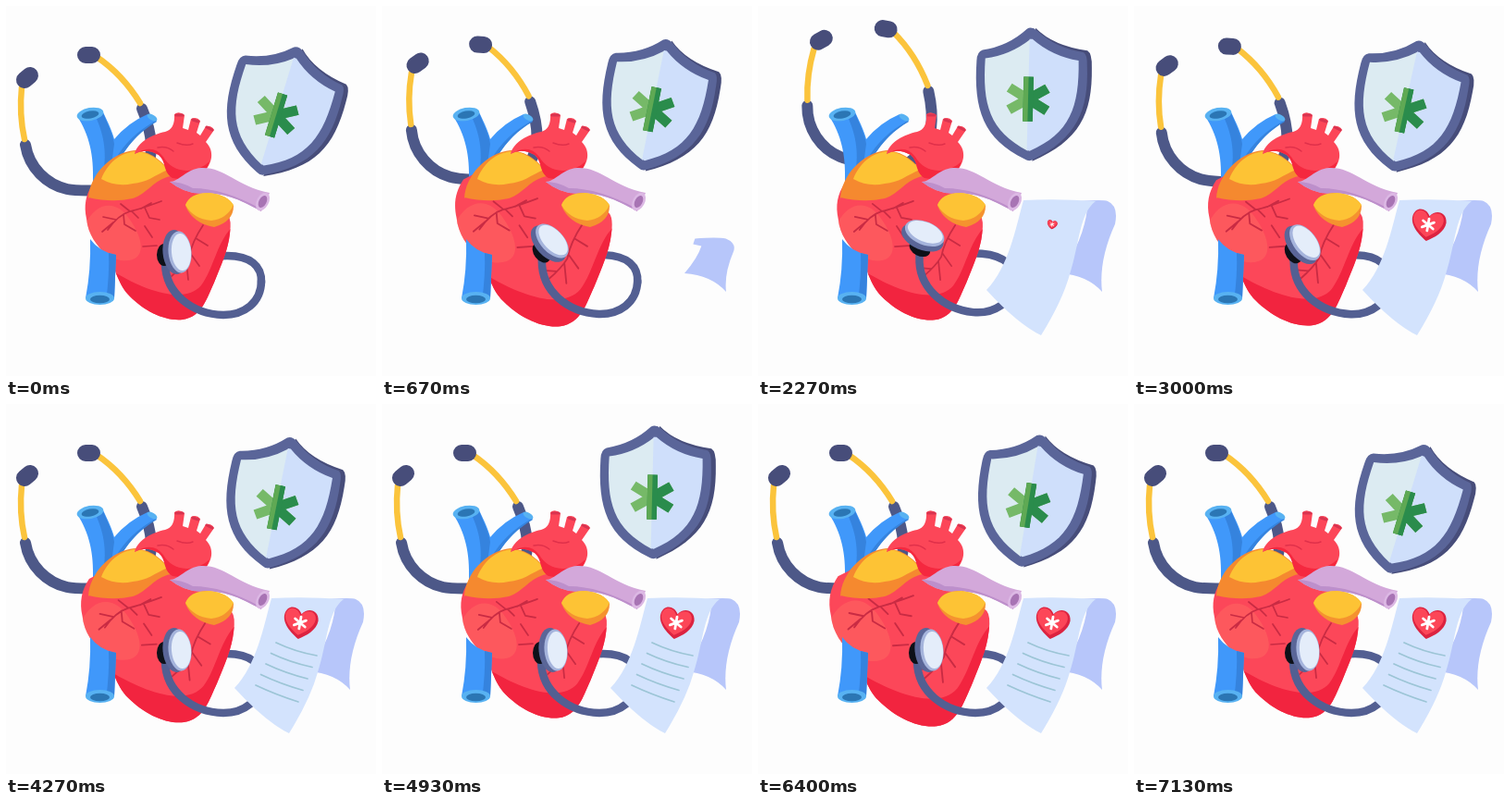
Write an HTML page that moves like this. It is 400 px wide and 400 px high and loops after 7200 ms.

```html
<!DOCTYPE html>
<html lang="en">
<head>
<meta charset="utf-8">
<title>Heart check-up</title>
<style>
html, body { margin: 0; width: 100%; height: 100%; overflow: hidden; background: #fdfdfd; }
svg { display: block; width: 100%; height: 100%; }
.line { fill: none; stroke-linecap: round; stroke-linejoin: round; }
.tube { stroke: #535f92; stroke-width: 8.5; }
.arm { stroke: #4d5888; stroke-width: 12; }
.wire { stroke: #fbc43c; stroke-width: 6.5; }
.vein { stroke: #c92b43; stroke-width: 1.7; }
.text { stroke: #9cc5d6; stroke-width: 1.7; }
</style>
</head>
<body>
<svg viewBox="0 0 400 400">
  <defs>
    <clipPath id="right"><rect x="0" y="-80" width="80" height="170"/></clipPath>
    <clipPath id="bodyClip"><use href="#bodyShape"/></clipPath>
    <path id="bodyShape" d="M104 187L94 192C86 204 84 216 87 230C89 248 98 258 108 269C120 284 120 300 134 314C150 330 172 341 191 339C212 336 217 316 225 299C233 279 240 264 242 246Q244 231 240 226L214 204L178 180C150 174 122 175 104 187Z"/>
    <path id="star" class="line" d="M0-24V24M-20-12L20 12M-20 12L20-12" style="stroke-width:10.5;stroke-linecap:butt"/>
  </defs>

  <g id="arms">
    <path class="line arm" d="M21 150C25 175 44 193 66 198Q80 201 130 198"/>
    <path class="line arm" d="M147 111Q156 132 157 150Q158 180 130 198"/>
    <path class="line wire" d="M17 88Q14 117 20 144M98 55Q126 74 145 105"/>
    <path class="line" stroke="#474d7a" stroke-width="18" d="M20 80L26 75M86 53H93"/>
  </g>
  <g class="loop">
    <path class="line tube" d="M200 284Q215 270 239 270C264 270 277 281 276 299"/>
  </g>

  <g>
    <path fill="#4098fa" d="M77 119L105 115C110 125 115 136 117 144Q132 126 153 117L163 124C146 135 136 145 126 160L94 190C95 160 90 140 77 119Z"/>
    <path fill="#3583de" d="M105 116C111 130 115 138 117 149Q115 165 113 178L105 182C110 155 104 136 98 122Z"/>
    <path fill="#3583de" d="M162 124C142 135 128 148 117 168L124 164C136 145 146 135 163 125Z"/>
    <ellipse cx="91" cy="117" rx="14.500" ry="7" fill="#58b2f2" transform="rotate(-10 91 117)"/>
    <ellipse cx="91" cy="117.500" rx="9.500" ry="4" fill="#2b76b4" transform="rotate(-10 91 117.500)"/>
    <ellipse cx="158" cy="120.500" rx="6" ry="3" fill="#58b2f2" transform="rotate(30 158 120.500)"/>
  </g>

  <g id="body">
    <use href="#bodyShape" fill="#fc4759"/>
    <g clip-path="url(#bodyClip)">
      <path fill="#f2243f" d="M250 235C229 248 226 282 211 302C194 322 154 310 116 287L120 350H250Z"/>
      <path fill="#ff6a62" opacity=".5" d="M84 240C96 211 119 208 134 231C152 257 150 278 124 275C106 271 92 258 84 240Z"/>
    </g>
    <path class="line vein" d="M168 211Q144 220 134 222Q121 226 110 242M150 218L155 229L166 231M134 222L124 214M127 225L128 236L140 243M119 231L105 228M116 234L104 244M146 219L157 213M136 222L143 229"/>
    <path class="line vein" d="M213 237Q201 255 198 271Q192 281 179 292M199 267L209 281M195 276L197 296M187 284L175 283M205 251L218 259M158 250L150 238M163 259L148 260"/>
  </g>

  <g>
    <path fill="#4098fa" d="M91 252Q101 266 119 269L117 316Q102 325 86 316Q92 285 91 252Z"/>
    <path fill="#3583de" d="M111 267L119 269L117 316L108 320Q112 290 111 267Z"/>
    <ellipse cx="101.500" cy="316" rx="15.500" ry="7" fill="#58b2f2"/>
    <ellipse cx="101.500" cy="317" rx="10.500" ry="4.300" fill="#2b76b4"/>
  </g>

  <g>
    <path fill="#f5892f" d="M89 208C90 184 112 159 139 156Q159 157 175 176L178 184C159 188 153 203 137 208Q115 213 89 207Z"/>
    <path fill="#fdc335" d="M103 187C110 170 123 158 141 157Q160 159 175 177C161 183 152 191 137 192Q119 196 103 187Z"/>
    <path fill="#fc4658" d="M139 160C142 147 158 139 172 136Q183 133 182 117Q187 113 193 118L191 132L197 134L200 122Q206 119 210 124L206 137L210 140L216 130Q222 129 225 134L216 147C226 157 223 171 213 180Q199 190 181 187C171 179 174 169 165 161Q151 153 139 160Z"/>
    <path fill="#f5283f" d="M139 160Q159 148 170 163Q178 177 195 178Q210 178 220 168Q215 187 193 188L180 186C169 179 174 169 165 161Q151 153 139 160Z"/>
    <path class="line" stroke="#d93450" stroke-width="3" d="M184 118H191M202 123L208 125M217 131L223 134"/>
    <path class="line" stroke="#e0304a" stroke-width="1.500" d="M164 153Q174 151 181 157M185 148Q195 152 202 149"/>
    <path fill="#d3a8da" d="M177 190C187 190 195 176 211 175C237 174 247 194 285 202L276 222C250 207 235 203 216 202Q196 205 177 190Z"/>
    <path fill="#bd8fcb" d="M177 190Q190 190 202 197Q235 197 275 219L276 222C250 207 235 203 216 202Q196 205 177 190Z"/>
    <ellipse cx="277.500" cy="211.500" rx="6.500" ry="10.500" fill="#dcb8e4" transform="rotate(28 277.500 211.500)"/>
    <ellipse cx="277.500" cy="211.500" rx="4" ry="7" fill="#a874b4" transform="rotate(28 277.500 211.500)"/>
    <path fill="#f5922f" d="M194 216Q197 203 218 202Q240 204 246 216Q246 233 225 239Q202 235 194 216Z"/>
    <path fill="#fdc335" d="M194 215Q199 202 220 202Q239 204 246 215Q239 230 222 232Q202 230 194 215Z"/>
  </g>

  <g class="loop">
    <path class="line tube" d="M276 297C276 321 257 334 235 334C201 333 173 311 172 279Q171 274 172 269"/>
    <g id="chest">
      <ellipse cx="171" cy="269" rx="8" ry="12" fill="#0d1018"/>
      <ellipse cx="183" cy="266" rx="13.500" ry="24" fill="#5a6698" transform="rotate(-5 183 266)"/>
      <ellipse cx="188" cy="266" rx="12.500" ry="22.500" fill="#a5b4dc" transform="rotate(-5 188 266)"/>
      <ellipse cx="189.500" cy="266" rx="10.500" ry="20" fill="#e4edfa" transform="rotate(-5 189.500 266)"/>
    </g>
  </g>

  <g id="shield">
    <path fill="#474d7a" d="M6-77Q25-58 61-54Q66-51 66-36C68 15 55 43 6 67Z"/>
    <path fill="#5a6599" d="M-3-76Q2-79 8-74Q28-56 57-52Q61-50 61-38C64 11 52 41 7 65Q3 68-2 65C-46 44-57 13-55-40Q-55-50-49-52Q-22-57-3-76Z"/>
    <path fill="#dcebf2" d="M1-65Q-20-47-46-43C-48 7-40 35 1 56Z"/>
    <path fill="#cfdffb" d="M0-65L3-65Q24-47 52-43C54 7 45 36 3 56L0 55Z"/>
    <use href="#star" stroke="#76b968"/>
    <use href="#star" stroke="#2a8c4c" clip-path="url(#right)"/>
    <path fill="#2a8c4c" d="M-5-24H5V24H-5Z"/>
    <path fill="#5fa954" d="M-5-24H0V24H-5Z"/>
  </g>

  <g id="paper">
    <path id="curl" fill="#b7c6fa"/>
    <path id="sheet" fill="#d3e3fd" d="M287 210Q323 208 365 211C347 225 348 256 337 290Q329 319 306 356Q281 344 247 307C271 282 278 242 287 210Z"/>
    <g id="badge">
      <path fill="#dc2340" d="M1 18C-8 13-19 4-18-6C-17-17-5-18 0-9C6-18 18-16 19-5C19 5 9 13 1 18Z"/>
      <path fill="#fc4658" d="M0 14C-8 9-18 2-17-7C-15-16-5-16-1-7C5-16 15-15 16-6C16 3 7 10 0 14Z"/>
      <path class="line" stroke="#fff" stroke-width="2.800" d="M0-6V7M-6-3L6 4M-6 4L6-3"/>
    </g>
    <g id="lines"></g>
  </g>
</svg>
<script>
const LOOP = 7200, SWING = 3600, BEAT = 2400;
const $ = id => document.getElementById(id);
const set = (el, name, value) => el.setAttribute(name, value);
const mix = (a, b, k) => a + (b - a) * k;
const clamp = x => Math.min(1, Math.max(0, x));
const ease = x => (1 - Math.cos(Math.PI * clamp(x))) / 2;
const span = (t, from, to) => ease((t - from) / (to - from));
const wave = (t, period) => (1 - Math.cos(2 * Math.PI * t / period)) / 2;
const loopParts = document.querySelectorAll('.loop');

const rows = Array.from({ length: 5 }, (_, i) => {
  const path = document.createElementNS('http://www.w3.org/2000/svg', 'path');
  const x = 292 - 5.5 * i, y = 258 + 11.5 * i;
  set(path, 'class', 'line text');
  set(path, 'd', `M${x} ${y}q21 10 ${44 + i * 0.5} ${14 + i}`);
  set(path, 'pathLength', 1);
  $('lines').append(path);
  return path;
});

function scaleAbout(x, y, s) {
  return `translate(${x} ${y}) scale(${s}) translate(${-x} ${-y})`;
}

function drawPaper(t) {
  const rise = span(t, 430, 880);
  const top = mix(302, 211, rise);
  const left = mix(326, 350, rise);
  const right = mix(374, 388, rise);
  set($('paper'), 'visibility', t > 440 ? 'visible' : 'hidden');
  set($('curl'), 'd', `M${left - 3} ${top + 6}L${left - 1} ${top}Q${left + 23} ${top - 2} ${right - 10} ${top}`
    + `Q${right + 2} ${top + 5} ${right - 2} ${mix(top, 310, 0.25)}`
    + `Q${mix(372, 368, rise)} ${mix(top, 310, 0.65)} 372 309Q356 291 327 289`
    + `Q${left + 2} ${mix(top, 289, 0.55)} ${left + 6} ${top + 8}Z`);

  const unroll = 1.08 * span(t, 820, 1300) - 0.08 * span(t, 1300, 1650);
  const slant = 1.2 * Math.max(0, unroll - 1);
  set($('sheet'), 'transform', `matrix(1 0 ${-slant} ${unroll} ${slant * 211} ${211 * (1 - unroll)})`);
  set($('badge'), 'transform', `translate(318 236) rotate(10) scale(${span(t, 2050, 2650)})`);
  rows.forEach((row, i) => {
    const k = span(t, 3000 + i * 200, 3400 + i * 200);
    set(row, 'stroke-dasharray', `${k} 2`);
    set(row, 'visibility', k > 0.01 ? 'visible' : 'hidden');
  });
}

function draw(t) {
  const swing = wave(t, SWING);
  const active = t < SWING;
  const tilt = active ? 12.4 * swing : 0;
  const turn = active ? -67 * (span(t, 0, 1200) - span(t, 2400, 3600)) : 0;
  set($('arms'), 'transform', `rotate(${tilt} 269 306)`);
  loopParts.forEach(part => set(part, 'transform', `rotate(${tilt * 0.45} 269 306)`));
  set($('chest'), 'transform', `rotate(${turn} 172 269)`);
  set($('body'), 'transform', scaleAbout(168, 248, 1 + 0.136 * wave(t, BEAT)));
  set($('shield'), 'transform', `translate(292 ${118 - 20.6 * swing}) rotate(${17 - 18.5 * swing}) scale(1.03 1)`);
  drawPaper(t);
}

const start = performance.now();
function frame() {
  draw((performance.now() - start) % LOOP);
  requestAnimationFrame(frame);
}
draw(0);
requestAnimationFrame(frame);
</script>
</body>
</html>
```
